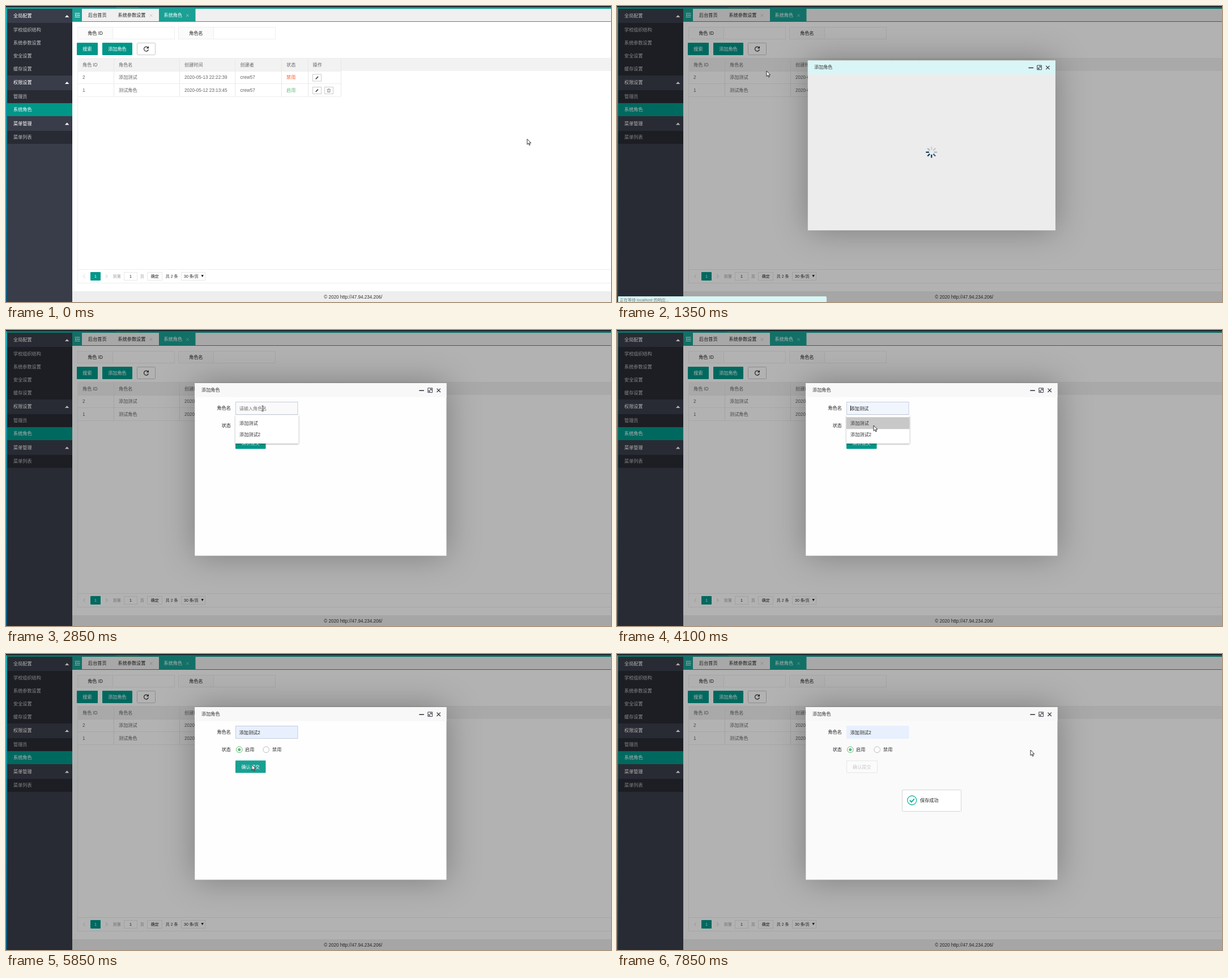
Animation, 1068 px wide and 524 px high, one loop 8 s. Source, as an HTML page:

```html
<!DOCTYPE html>
<html lang="zh-CN">
<head>
<meta charset="utf-8">
<style>
html, body { margin: 0; width: 100%; height: 100%; overflow: hidden; background: #fff; }
svg { display: block; width: 100%; height: 100%; }
text { font: 8.15px "Liberation Sans", "Noto Sans CJK SC", "Noto Sans CJK", sans-serif; white-space: pre; }
.bold { font-weight: 500; }
.small { font-size: 7.05px; }
#panel { filter: drop-shadow(0 0 29px rgba(0, 0, 0, .3)); }
</style>
</head>
<body>
<svg id="stage" viewBox="0 0 1068 524"></svg>
<script>
const TEAL = '#009688', TAB = '#1aa094', RED = '#ff5722', GREEN = '#5fb878';

const rect = (x, y, w, h, fill, stroke, extra = '') => stroke
  ? `<rect x="${x + .5}" y="${y + .5}" width="${w - 1}" height="${h - 1}" fill="${fill}" stroke="${stroke}" ${extra}/>`
  : `<rect x="${x}" y="${y}" width="${w}" height="${h}" fill="${fill}" ${extra}/>`;
// y is the vertical centre of the text
const text = (x, y, s, fill = '#333', cls = '', anchor = 'start') =>
  `<text x="${x}" y="${y + 3}" fill="${fill}" class="${cls}" text-anchor="${anchor}">${s}</text>`;
const mid = (x, y, s, fill, cls) => text(x, y, s, fill, cls, 'middle');
const line = (d, stroke, width = 1, extra = '') =>
  `<path d="${d}" fill="none" stroke="${stroke}" stroke-width="${width}" ${extra}/>`;
const cross = (x, y, r, color, width) =>
  line(`M${x - r} ${y - r}l${2 * r} ${2 * r}m0 ${-2 * r}l${-2 * r} ${2 * r}`, color, width);
const group = (id, body) => `<g id="${id}">${body}</g>`;
const button = (x, y, w, s) => rect(x, y, w, 22, TEAL, '', 'rx="1"') + mid(x + w / 2, y + 11, s, '#fff', 'bold');

function sidebar() {
  const head = (y, s) => text(13, y, s, '#fff', 'bold') + `<path d="M104 ${y + 3}l3.7-4 3.7 4z" fill="#fff"/>`;
  const item = (y, s) => text(13, y, s, '#bfc0c3');
  return rect(2, 5, 115, 519, '#393d49') +
    rect(2, 30, 115, 93, '#282b33') + rect(2, 149, 115, 46, '#282b33') + rect(2, 221, 115, 23, '#282b33') +
    rect(2, 172, 115, 23, TEAL) +
    head(17, '全局配置') + head(135, '权限设置') + head(207.5, '菜单管理') +
    ['学校组织结构', '系统参数设置', '安全设置', '缓存设置'].map((s, i) => item(42 + 23.1 * i, s)).join('') +
    item(160, '管理员') + text(13, 183.3, '系统角色', '#fff', 'bold') + item(232, '菜单列表');
}

function tabs() {
  return rect(117, 5, 951, 22.5, '#f0f0f0') + rect(117, 27, 951, 1, TAB) +
    rect(117, 5, 17, 23, TAB) + rect(270, 5, 64.5, 23, TAB) +
    line('M121.5 13H130.5M125 16.3H130.5M121.5 19.5H130.5', '#fff', 1.2) +
    '<path d="M124 14.5v3.6l-2.5-1.8z" fill="#fff"/>' +
    text(145, 16, '后台首页', '#222') + text(197.5, 16, '系统参数设置', '#222') + cross(256, 16.7, 2.3, '#bbb', .8) +
    text(278.5, 16, '系统角色', '#fff') + cross(320.5, 16.7, 2.3, '#a5d8d3', .8);
}

function searchForm() {
  const field = (x, s) => rect(x, 37, 172, 22, '#fff', '#eee') + rect(x, 37, 63, 22, '#fbfbfb', '#eee') +
    mid(x + 31.5, 48, s, '#222');
  return field(126, '角色 ID') + field(304, '角色名') +
    button(125, 65, 37, '搜索') + group('add', button(170, 65, 53, '添加角色')) +
    rect(231, 65, 33, 22, '#fff', '#c9c9c9', 'rx="1"') +
    line('M250.3 73.2A4 4 0 1 0 251.4 77', '#333', 1.2) + '<path d="M252 71v4.2h-4.2z" fill="#333"/>';
}

function table() {
  const cols = [126, 190, 306, 404, 486, 533, 591], grey = '#666';
  const xs = [135, 199, 315, 413.5, 495, 541.5];
  const row = (y, cells, color) => cells.map((s, i) => text(xs[i], y, s, i == 4 ? color : grey)).join('');
  const edit = y => rect(541, y, 16, 13, '#fff', '#ccc') + line(`M546.7 ${y + 8.8}l4.3-4.3`, '#555', 1.8);
  return rect(126, 93, 942, 22, '#f2f2f2') + rect(126, 115, 465, 45, '#fff') +
    group('hoverRow', rect(126, 138, 465, 22, '#f7f7f7')) +
    line('M126 92.5H1068M126 115.5H591M126 137.5H591M126 160.5H591M126.5 93V490M126 466.5H1068M126 490.5H1068', '#eee') +
    line(cols.slice(1).map(x => `M${x + .5} 93V160`).join(''), '#e8e8e8') +
    row(104, ['角色 ID', '角色名', '创建时间', '创建者', '状态', '操作'], grey) +
    row(126.3, ['2', '添加测试', '2020-05-13 22:22:39', 'crew57', '禁用'], RED) +
    row(149, ['1', '测试角色', '2020-05-12 23:13:45', 'crew57', '启用'], GREEN) +
    edit(120.5) + edit(143) + rect(562, 143, 16, 13, '#fff', '#ccc') +
    line('M566.8 147.5h6M569 146.5h1.6M567.6 148v4.5h4.4V148M569.8 149v2.5', '#777', .8);
}

function pager() {
  return line('M139.5 475.5l-3 3 3 3', '#ccc') + line('M176 475.5l3 3-3 3', '#bbb') +
    rect(149, 471, 18, 15, TEAL, '', 'rx="1"') + mid(158, 478.3, '1', '#fff', 'small bold') +
    text(188.7, 478, '到第', '#999', 'small') + rect(208, 471, 24, 15, '#fff', '#e8e8e8') +
    mid(220, 478.3, '1', '#222', 'small') + text(236.8, 478, '页', '#999', 'small') +
    rect(249, 471, 27, 15, '#fff', '#e8e8e8') + mid(262.7, 478.3, '确定', '#222', 'small') +
    text(281.7, 478, '共 2 条', '#333', 'small') + rect(309, 471, 43, 15, '#fff', '#e8e8e8') +
    text(314, 478.3, '30 条/页', '#222', 'small') + '<path d="M344.5 476h4.4l-2.2 4.2z" fill="#222"/>';
}

function spinner() {
  const alpha = [.3, .75, 1, 1, 1, .3, .15, .2];
  return alpha.map((a, i) => line('M559.6 259H565.2', '#0b3a59', 2.3,
    `opacity="${i ? a : .3}" transform="rotate(${45 * i} 555.2 259)"`)).join('');
}

function dialog() {
  const dark = '#2e2d3c';
  const radio = (x, color, dot) => `<circle cx="${x}" cy="169.3" r="5.3" fill="#fff" stroke="${color}"/>` +
    (dot ? `<circle cx="${x}" cy="169.3" r="2.6" fill="${color}"/>` : '');
  return '<rect id="panel" x="333.3" y="94" width="444.2" height="305.6"/>' +
    '<rect id="titleBar" x="333.3" y="94" width="444.2" height="25"/>' +
    text(345, 106, '添加角色') +
    line('M729.3 107.2h8.6', dark, 1.5) + cross(763.7, 106.8, 3.2, dark, 1.2) +
    line('M744.8 102.8h7.8v7.8h-7.8zM746.5 109l4.4-4.4M748.5 104.5h2.5v2.5M746.4 106.4v2.6h2.6', dark, .9) +
    group('spin', spinner()) +
    group('form',
      text(397, 138.3, '角色名', '#222', '', 'end') + text(397, 169.3, '状态', '#222', '', 'end') +
      '<rect id="input" x="405.5" y="127.5" width="109.5" height="22"/><text id="value" x="411.7" y="141.7"></text>' +
      radio(411.8, GREEN, true) + text(422, 169.3, '启用') + radio(459.2, '#bbb') + text(470, 169.3, '禁用') +
      group('submit', button(405, 188.5, 53.5, '确认提交')) +
      group('disabled', rect(405, 188.5, 55, 22, '#fbfbfb', '#e6e6e6') + mid(432.3, 199.5, '确认提交', '#c9c9c9')) +
      group('list', rect(405, 151, 111.5, 50, '#fff', '', 'style="filter:drop-shadow(0 1px 1.5px rgba(0,0,0,.35))"') +
        '<rect id="pick" x="405" width="111.5" height="21" fill="#c8c8c8"/>' +
        text(412, 164.5, '添加测试') + text(412, 185.3, '添加测试2')) +
      group('caret', rect(412, 134, 1, 9, '#111')) +
      group('toast', rect(503, 240, 105, 39, '#fff', '#d3d4d3', 'rx="1"') +
        '<circle cx="520.7" cy="259" r="8" fill="none" stroke="#16b59b" stroke-width="1.3"/>' +
        line('M516.8 259l3 3 5.2-5.6', '#16b59b', 2) + text(535, 259.3, '保存成功', '#222')));
}

const pointers =
  group('arrow', '<path d="M0 0V16L3.7 12.6 6.2 18.4 8.7 17.3 6.2 11.7H11.3Z" transform="scale(.6)" fill="#fff" stroke="#111" stroke-width="1.4"/>') +
  group('hand', '<path d="M-1 1Q0-.6 1 1V5Q2 4 2.7 5.3 3.7 4.6 4.2 5.8 5.5 5.4 5.5 7V9.5L4.3 13H-1.2L-4.3 8.3Q-4 6.4-2.4 7.4L-1 8.8Z" fill="#fff" stroke="#111" stroke-width=".9"/>') +
  group('beam', line('M-1.7 -4.5H1.7M0 -4.5V4.5M-1.7 4.5H1.7', '#222', .8));

stage.innerHTML =
  '<linearGradient id="edge" x2="0" y2="1"><stop stop-color="#12b0bd"/><stop offset=".5" stop-color="#0a86a3"/><stop offset="1" stop-color="#08567f"/></linearGradient>' +
  rect(0, 0, 1068, 524, '#fff') + rect(0, 0, 1068, 2, '#18262e') + rect(0, 2, 1068, 3, TAB) +
  rect(195, 2, 40, 2, '#5f9f5c') + rect(0, 5, 2, 519, 'url(#edge)') +
  sidebar() + tabs() + searchForm() + table() + pager() +
  rect(117, 505, 951, 19, '#eee') + mid(612.8, 515.3, '© 2020 http://47.94.234.206/') +
  group('shade', rect(2, 2, 1066, 522, '#000', '', 'opacity=".3"')) +
  group('dialog', dialog()) +
  group('status', '<path d="M2 514H368q2 0 2 2V524H2z" fill="#d8f6f5"/>' +
    text(4.8, 519.5, '正在等待 localhost 的响应...', '#6b7477', 'small')) +
  group('pointer', pointers);

const $ = id => document.getElementById(id);
const show = (id, on) => $(id).style.display = on ? '' : 'none';
const set = (id, attrs) => { for (const k in attrs) $(id).setAttribute(k, attrs[k]); };

// time, x, y, shape
const track = [
  [0, 920, 235.5], [100, 885, 250], [350, 819, 261], [600, 455, 115], [850, 252, 87], [1100, 202, 73],
  [1350, 264, 115], [1600, 385, 155], [1850, 466, 169.5, 'hand'], [2100, 453, 139, 'beam'],
  [4100, 453, 169], [4600, 454, 181], [5100, 448, 187], [5350, 439, 193], [5600, 436, 196], [5850, 434, 196],
  [6350, 445, 204], [6600, 496, 236], [6850, 540, 256],
  [7100, 612, 236], [7350, 672, 203], [7600, 718, 177], [7850, 730, 170]
];

function draw(t) {
  const during = (from, to = 8000) => t >= from && t < to;
  const [, x, y, shape = 'arrow'] = track.findLast(p => p[0] <= t);
  set('pointer', { transform: `translate(${x} ${y})` });
  for (const id of ['arrow', 'hand', 'beam']) show(id, id == shape);

  set('add', { opacity: during(1100, 1350) ? .82 : 1 });
  show('hoverRow', during(600, 1350));
  show('shade', during(1350));
  show('dialog', during(1350));
  show('status', during(1350, 2100));
  show('spin', during(1350, 1850));
  show('form', during(1850));

  const opening = t < 1600;
  set('dialog', { transform: `translate(555.4 246.8) scale(${opening ? .984 : 1}) translate(-555.4 -246.8)` });
  set('panel', { fill: t < 1850 ? '#ececec' : during(6350) ? '#fafafa' : '#fefefe' });
  set('titleBar', { fill: opening ? '#d9f5f5' : '#f8f8f8' });

  const filled = t >= 4100, focused = during(2350, 6100);
  set('input', {
    fill: t >= 4850 ? '#e8f0fe' : filled ? '#f1f6fe' : '#fafafa',
    stroke: focused ? '#c6cddb' : filled ? '#e8f0fe' : '#e6e6e6'
  });
  $('value').textContent = t < 4100 ? '请输入角色名' : t < 4600 ? '添加测试' : '添加测试2';
  set('value', { fill: filled ? '#222' : '#777' });
  show('caret', during(2350, 2850) || during(3100, 3600) || during(4100, 4600));
  show('list', during(2350, 4850));
  show('pick', filled);
  set('pick', { y: t < 4600 ? 154.3 : 175.3 });

  show('submit', t < 6100);
  set('submit', { opacity: during(5350, 6100) ? .9 : 1 });
  show('disabled', during(6100));
  show('toast', during(6350));
}

function tick() {
  draw(performance.now() % 8000);
  requestAnimationFrame(tick);
}
tick();
</script>
</body>
</html>
```
